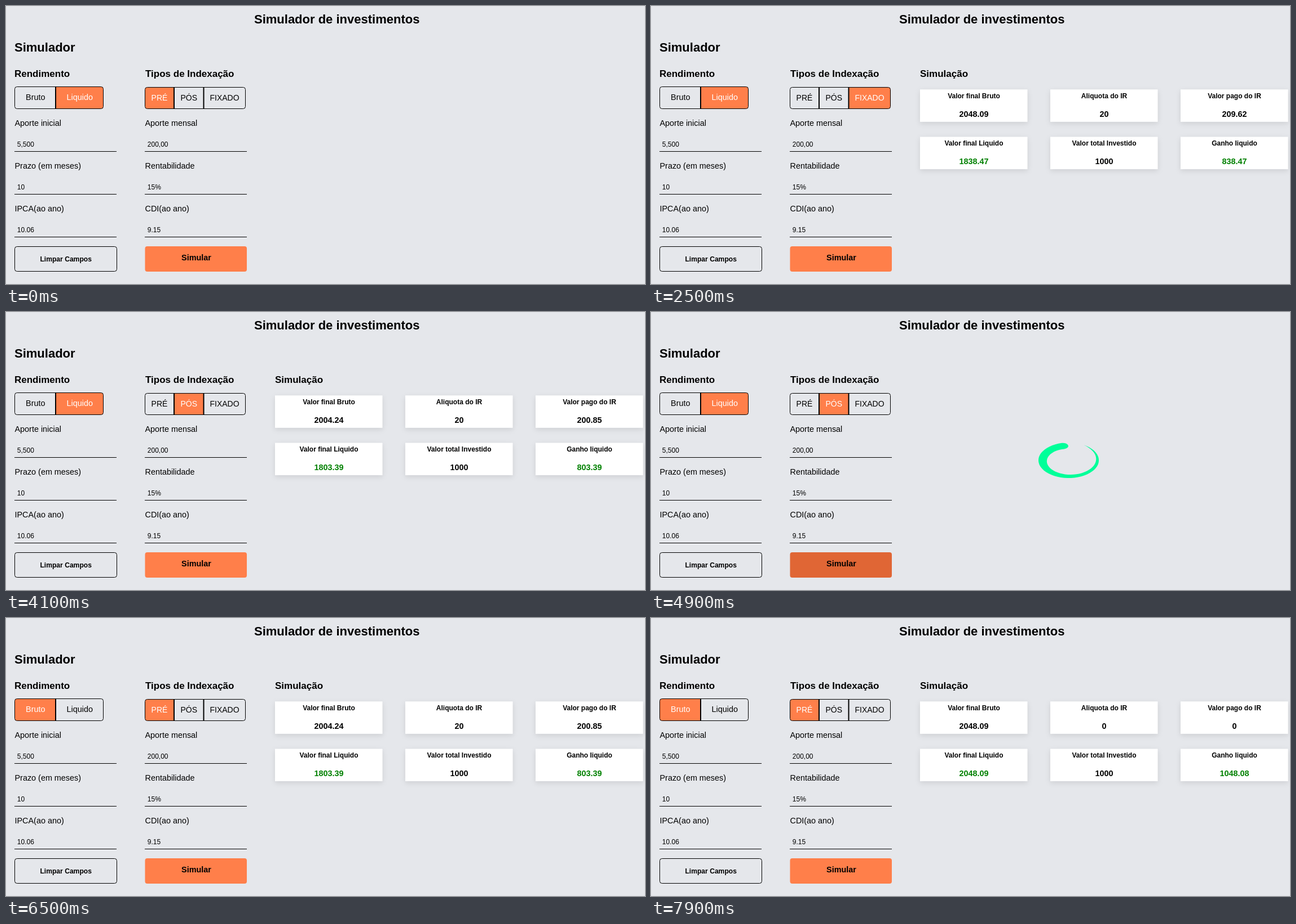
Recreate the animation shown at these times as an HTML page. Size 1133 by 494 pixels, loop 8400 ms.

```html
<!DOCTYPE html>
<html lang="pt-BR">
<head>
<meta charset="utf-8">
<title>Simulador de investimentos</title>
<style>
  html, body { margin: 0; width: 100%; height: 100%; overflow: hidden; background: #e5e7eb; }
  svg { display: block; width: 1133px; height: 494px; font: 14.4px "Liberation Sans", Arial, sans-serif; }
  .b { font-weight: bold; }
  .mid { text-anchor: middle; }
  .line { fill: none; stroke: #000; }
  .card { fill: #fff; filter: drop-shadow(0 3px 5px rgba(0, 0, 0, .1)); }
</style>
</head>
<body>
<svg id="stage" viewBox="0 0 1133 494"></svg>
<script>
const LOOP = 8400, STEP = 100;
const ORANGE = [255, 127, 74], DARK = [224, 102, 53];
const stage = document.getElementById('stage');

const text = (x, y, str, size = 14.4, cls = '', extra = '') =>
  `<text x="${x}" y="${y}" font-size="${size}" class="${cls}" ${extra}>${str}</text>`;

// Segmented control: edges are the cell borders, options are [label, text centre]
function toggle(id, edges, top, size, base, options) {
  const left = edges[0], right = edges[edges.length - 1], h = 182.5 - top;
  const frame = `x="${left}" y="${top}" width="${right - left}" height="${h}" rx="4"`;
  let s = `<clipPath id="${id}Clip"><rect ${frame}/></clipPath><g clip-path="url(#${id}Clip)">`;
  options.forEach((o, i) => {
    s += `<rect class="${id}Fill" x="${edges[i]}" y="${top}" width="${edges[i + 1] - edges[i]}" height="${h}" fill="rgb(${ORANGE})"/>`;
  });
  s += `</g><rect class="line" ${frame}/>`;
  for (const x of edges.slice(1, -1)) s += `<path class="line" stroke-width="2" d="M${x} ${top}V182.5"/>`;
  for (const [label, cx] of options) s += text(cx, base, label, size, `mid ${id}Label`);
  return s;
}

function field(col, row, label, value) {
  const x = col ? 246.5 : 15.5, y = 76 * row;
  return text(x, 213 + y, label) + text(x + 4.3, 250 + y, value, 12) +
    `<path class="line" d="M${x - .5} ${258.5 + y}h181"/>`;
}

function card(label, i) {
  const x = 477 + 231 * (i % 3), y = i < 3 ? 148.3 : 232.5, cx = x + 95.5;
  const base = i < 3 ? 164 : 248;
  return `<rect class="card" x="${x}" y="${y}" width="190.5" height="57.5"/>` +
    text(cx, base, label, 12, 'b mid') +
    text(cx, base + 33, '', 14.4, 'b mid value', i % 2 && i > 2 || i === 5 ? 'fill="green"' : '');
}

// Tapered ring with a round head near the top
function ring() {
  const R = 31.5, n = 48, head = 11, start = -13, span = 317;
  const at = (r, deg) => {
    const a = deg * Math.PI / 180;
    return `${(r * Math.sin(a)).toFixed(2)} ${(-r * Math.cos(a)).toFixed(2)}`;
  };
  const outer = [], inner = [];
  for (let i = 0; i <= n; i++) {
    const u = i / n, a = start - span * u;
    outer.push(at(R, a));
    inner.unshift(at(R - head * (1 - u) ** .8, a));
  }
  return `M${outer.join('L')}L${inner.join('L')}A${head / 2} ${head / 2} 0 0 0 ${outer[0]}Z`;
}

stage.innerHTML =
  text(586.7, 31, 'Simulador de investimentos', 22, 'b mid') +
  text(15, 81, 'Simulador', 22, 'b') +
  text(15, 126, 'Rendimento', 17, 'b') +
  text(247, 126, 'Tipos de Indexação', 17, 'b') +
  toggle('yield', [15.5, 88, 172.5], 143.5, 14.4, 167, [['Bruto', 52.3], ['Liquido', 130.7]]) +
  toggle('index', [246.5, 298, 350.5, 424.5], 144.5, 14, 168, [['PRÉ', 272], ['PÓS', 324.3], ['FIXADO', 387.5]]) +
  field(0, 0, 'Aporte inicial', '5,500') + field(1, 0, 'Aporte mensal', '200,00') +
  field(0, 1, 'Prazo (em meses)', '10') + field(1, 1, 'Rentabilidade', '15%') +
  field(0, 2, 'IPCA(ao ano)', '10.06') + field(1, 2, 'CDI(ao ano)', '9.15') +
  '<rect class="line" x="15.5" y="427.5" width="181" height="44" rx="4"/>' +
  text(106.2, 454, 'Limpar Campos', 12.1, 'b mid') +
  '<rect id="run" x="246.5" y="427" width="180.5" height="45" rx="4"/>' +
  text(337.5, 452, 'Simular', 14.4, 'b mid') +
  `<g id="result">${text(477, 126, 'Simulação', 17, 'b')}<g id="cards">` +
  ['Valor final Bruto', 'Aliquota do IR', 'Valor pago do IR',
   'Valor final Liquido', 'Valor total Investido', 'Ganho liquido'].map(card).join('') + '</g></g>' +
  `<path id="loader" fill="#00ff99" d="${ring()}"/>`;

const [run, result, cards, loader] =
  ['run', 'result', 'cards', 'loader'].map(id => document.getElementById(id));
const values = stage.querySelectorAll('.value');

// Timelines: [time, state...]
const hover = [[0, 0], [600, .4], [700, .75], [900, 1], [2000, 0], [3100, 1], [3700, 0],
  [4700, 1], [5700, 0], [7200, 1], [7900, 0]];
const yieldPick = [[0, 1], [5700, 0]];
const indexPick = [[0, 0], [2500, 2], [4100, 1], [6500, 0]];
const fixed = ['2004.24', '20', '200.85', '1803.39', '1000', '803.39'];
// [loader shown, cards enter, values]
const runs = [
  [1400, 1450, ['2048.09', '20', '209.62', '1838.47', '1000', '838.47']],
  [3200, 3250, fixed],
  [4900, 4950, fixed],
  [7400, 7550, ['2048.09', '0', '0', '2048.09', '1000', '1048.08']]
];
const current = (list, t) => list.filter(e => e[0] <= t).pop();

function pick(id, chosen) {
  stage.querySelectorAll(`.${id}Fill`).forEach((el, i) => el.style.display = i === chosen ? '' : 'none');
  stage.querySelectorAll(`.${id}Label`).forEach((el, i) => el.setAttribute('fill', i === chosen ? '#fff' : '#000'));
}

function draw(t) {
  const k = current(hover, t)[1];
  run.setAttribute('fill', `rgb(${ORANGE.map((c, i) => Math.round(c + (DARK[i] - c) * k))})`);
  pick('yield', current(yieldPick, t)[1]);
  pick('index', current(indexPick, t)[1]);

  const sim = current(runs, t);
  const loading = sim && t < sim[1];
  result.style.display = sim && !loading ? '' : 'none';
  loader.style.display = loading ? '' : 'none';
  if (loading) {
    loader.setAttribute('transform', `translate(740.5 263.5) scale(1.7 1) rotate(${(t - sim[0]) * .36})`);
  } else if (sim) {
    const p = 1 - (1 - Math.min(1, (t - sim[1]) / 350)) ** 1.3;
    cards.setAttribute('transform', `translate(${-25 * (1 - p)} 0)`);
    cards.setAttribute('opacity', p);
    values.forEach((el, i) => el.textContent = sim[2][i]);
  }
}

const begin = performance.now();
function tick() {
  const t = (performance.now() - begin) % LOOP;
  draw(Math.floor(t / STEP) * STEP);
  requestAnimationFrame(tick);
}
tick();
</script>
</body>
</html>
```
